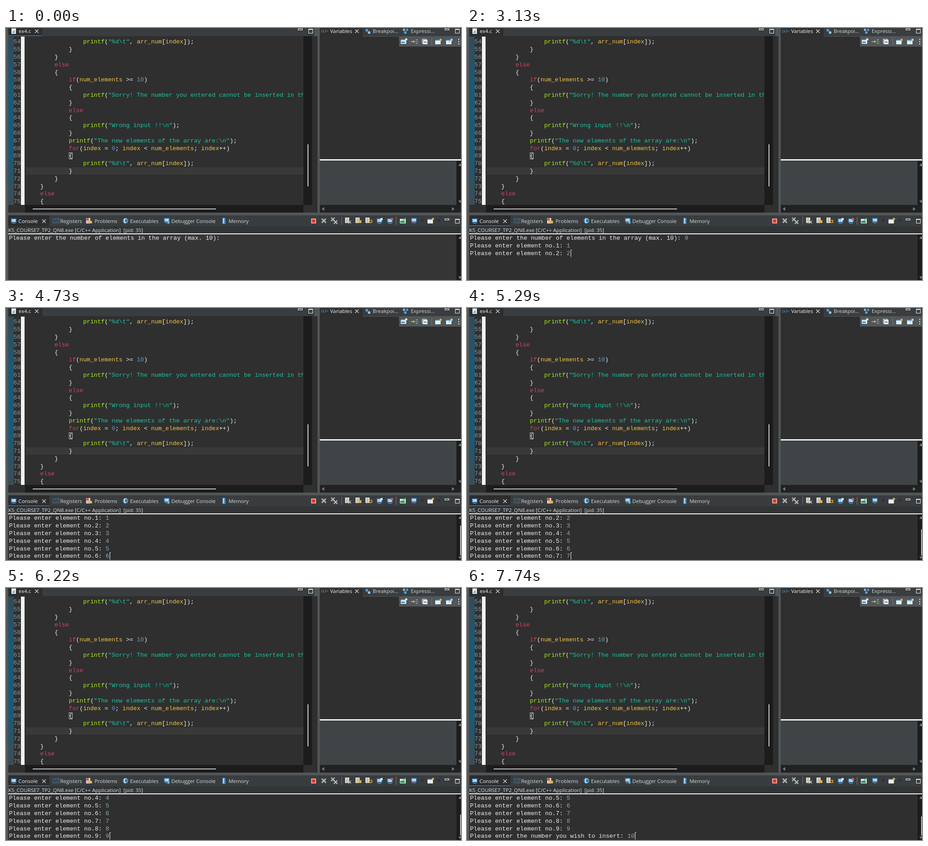
These frames come from a looping animation (1005 px wide and 557 px high, 8 s). An HTML page with a canvas:

```html
<!DOCTYPE html>
<html lang="en">
<head>
<meta charset="utf-8">
<title>Console session</title>
<style>
html, body { margin: 0; width: 100%; height: 100%; overflow: hidden; background: #515658; }
canvas { display: block; }
</style>
</head>
<body>
<canvas id="stage" width="1005" height="557"></canvas>
<script>
const g = document.getElementById('stage').getContext('2d');
const CHAR = 7.9, LINE = 16.8, LOOP = 8000;
const MONO = '13.165px "Liberation Mono", monospace';
const UI = '11.4px "Open Sans", "Noto Sans", sans-serif';
const FRAME = '#515658', BAR = '#393d3f', PANE = '#2f2f2f', TRACK = '#1c1c1c', TAB = '#2b2d2e';
const WHITE = '#f4f4f4', PALE = '#d8dadb', BLUE = '#4f9fd8', GOLD = '#e3b341', RED = '#e0533f';

function box(color, x, y, w, h) {
  g.fillStyle = color;
  g.fillRect(x, y, w, h);
}
function text(str, x, y, color = PALE, font = UI) {
  g.font = font;
  g.fillStyle = color;
  g.fillText(str, x, y);
}
function line(color, width, ...pts) {
  g.strokeStyle = color;
  g.lineWidth = width;
  g.beginPath();
  for (let i = 0; i < pts.length; i += 2) g.lineTo(pts[i], pts[i + 1]);
  g.stroke();
}
function outline(color, x, y, w, h) {
  g.strokeStyle = color;
  g.lineWidth = 1;
  g.strokeRect(x + .5, y + .5, w - 1, h - 1);
}
function dot(color, x, y, r) {
  g.fillStyle = color;
  g.beginPath();
  g.arc(x, y, r, 0, 7);
  g.fill();
}
function cross(x, y, r, color = PALE, width = 1.2) {
  line(color, width, x - r, y - r, x + r, y + r);
  line(color, width, x + r, y - r, x - r, y + r);
}
function arrow(x, y, dx, dy, color = '#77797a', r = 4) {
  g.fillStyle = color;
  g.beginPath();
  g.moveTo(x + dx * r, y + dy * r);
  g.lineTo(x - dx * r / 2 + dy * r, y - dy * r / 2 + dx * r);
  g.lineTo(x - dx * r / 2 - dy * r, y - dy * r / 2 - dx * r);
  g.fill();
}
function paneButtons(x, y) {
  outline(WHITE, x - 5, y - 1, 10, 4);
  outline(WHITE, x + 18, y, 10, 10);
  box(WHITE, x + 18, y, 10, 2);
}

// small toolbar pictures, centred on x, y
function page(x, y, accent) {
  box('#e9e4d2', x - 6, y - 6, 9, 12);
  for (let i = 0; i < 4; i++) box('#7a8b99', x - 4, y - 4 + i * 2.5, 5, 1);
  if (accent) box(accent, x + 1, y, 6, 6);
}
function screen(x, y, accent) {
  box('#3f86c6', x - 6, y - 5, 12, 9);
  box('#e6f0f8', x - 4, y - 3, 8, 5);
  box('#3f86c6', x - 3, y - 1, 5, 1);
  box('#9fb4c4', x - 4, y + 5, 8, 1);
  if (accent) box(accent, x + 2, y - 6, 5, 5);
}
function windowIcon(x, y, accent) {
  box('#e8eef2', x - 7, y - 4, 12, 10);
  box(BLUE, x - 7, y - 4, 12, 2);
  dot(accent, x + 5, y - 4, 2.5);
}

const code = String.raw`4printf("%d\t", arr_num[index]);
3}
2}
2else
2{
3if(num_elements >= 10)
3{
4printf("Sorry! The number you entered cannot be inserted in the
3}
3else
3{
4printf("Wrong input !!\n");
3}
3printf("The new elements of the array are:\n");
3for(index = 0; index < num_elements; index++)
3{
4printf("%d\t", arr_num[index]);
3}
2}
1}
1else
1{`.split('\n');

function tokenColor(tok) {
  if (tok[0] === '"') return '#17c6a3';
  if (tok === 'printf') return '#a7ec21';
  if (/^(if|else|for)$/.test(tok)) return '#d9435f';
  if (/^\d/.test(tok)) return '#6897bb';
  return /^\w/.test(tok) ? '#f2c443' : '#f0f1ec';
}

function drawEditor() {
  box(BAR, 5, 0, 676, 18);
  box(TAB, 5, 0, 75, 18);
  box('#e8eef2', 12, 1, 10, 12);
  text('.c', 13, 11, '#2465a0', 'bold 9px "Open Sans", sans-serif');
  text('ex4.c', 28, 11, WHITE);
  cross(68, 7, 4);
  paneButtons(650, 2);

  box(PANE, 5, 18, 683, 390);
  box(TRACK, 657, 18, 19, 373);
  box(TRACK, 42, 391, 615, 17);
  box('#d0d0d0', 666, 257, 2, 93);
  box('#c4c4c4', 59, 399, 405, 2);

  const strip = g.createLinearGradient(0, 19, 0, 391);
  strip.addColorStop(0, '#36454d');
  strip.addColorStop(.3, '#1b5670');
  strip.addColorStop(.7, '#1b5670');
  strip.addColorStop(1, '#40474b');
  box(strip, 5, 19, 12, 372);
  for (let y = 19; y < 391; y++)
    for (let x = 5 + y % 2; x < 17; x += 2) box('rgba(25,130,175,.2)', x, y, 1, 1);
  box('#f3f3f3', 33, 19, 8, 372);
  box('#393939', 44, 308, 613, 16);

  g.save();
  g.beginPath();
  g.rect(5, 19, 652, 372);
  g.clip();
  code.forEach((row, i) => {
    const y = 34.4 + i * LINE;
    text(String(54 + i), 16.5, y, '#8798a5', MONO);
    let x = 44 + row[0] * 4 * CHAR;
    for (const tok of row.slice(1).match(/"[^"]*"?|\w+|\s+|[^\w\s"]/g)) {
      text(tok, x, y, tokenColor(tok), MONO);
      x += tok.length * CHAR;
    }
  });
  g.restore();
  outline('#c8c8c8', 139, 275, 8, 15);
}

function drawVariables() {
  box(BAR, 693, 0, 312, 18);
  box(PANE, 693, 0, 95, 19);
  text('(x)=', 696, 10, BLUE, '9.5px "Open Sans", sans-serif');
  text('Variables', 716, 11, WHITE);
  cross(775, 7, 4);
  dot(BLUE, 797, 5, 3);
  dot('#8fc3e8', 802, 10, 3);
  text('Breakpoi...', 810, 11);
  dot('#8fc3e8', 879, 4, 2.5);
  dot(BLUE, 886, 4, 2.5);
  dot(BLUE, 882, 10, 3);
  text('Expressi...', 894, 11);
  paneButtons(974, 2);

  box(PANE, 693, 19, 312, 275);
  box(FRAME, 868, 19, 137, 22);
  windowIcon(879, 29, '#d8e6f0');
  box('#4d87b0', 873, 30, 8, 3);
  line(GOLD, 1.5, 894, 30, 902, 30);
  arrow(901, 30, 1, 0, GOLD, 3);
  for (let i = 0; i < 3; i++) box(BLUE, 905, 25 + i * 4, 5, 2);
  outline(WHITE, 919, 24, 10, 10);
  box('#e8eef2', 921, 26, 10, 10);
  box('#4c7fa8', 923, 30, 6, 2);
  box('#75797b', 940, 22, 1, 16);
  windowIcon(955, 30, GOLD);
  windowIcon(979, 30, '#d8dadb');
  line('#8fa3b0', 1.5, 978, 31, 984, 25);
  for (let i = 0; i < 3; i++) dot(WHITE, 1000, 25 + i * 5, 1.2);

  box('#f5f5f5', 693, 290, 312, 3);
  box('#3f4447', 693, 294, 302, 97);
  box(TRACK, 995, 294, 10, 97);
  box('#222', 693, 391, 312, 17);
  arrow(1003, 303, 0, -1);
  arrow(1003, 383, 0, 1);
  arrow(701, 400, -1, 0);
  arrow(987, 400, 1, 0);
}

function drawConsoleBar() {
  box(BAR, 5, 414, 1000, 24);
  box(TAB, 5, 414, 91, 24);
  screen(17, 426);
  text('Console', 27.5, 430.5, WHITE);
  cross(84, 427, 4);
  text('1010', 102, 425, '#4b86ae', '7px "Liberation Mono", monospace');
  text('0101', 102, 432, '#4b86ae', '7px "Liberation Mono", monospace');
  text('Registers', 119.5, 430.5);
  page(183, 426, GOLD);
  dot(RED, 180, 423, 3);
  text('Problems', 195.5, 430.5);
  dot('#5f9ac4', 264, 426, 6);
  box('#dfe9f0', 261, 421, 4, 10);
  arrow(265, 426, 1, 0, '#2c6a9a', 4);
  text('Executables', 274, 430.5);
  screen(355, 425);
  dot('#69c0d8', 359, 430, 2.5);
  text('Debugger Console', 365, 430.5);
  box('#3f86c6', 478, 420, 7, 13);
  box('#a9d3ee', 479, 420, 3, 12);
  text('Memory', 491.5, 430.5);

  box('#f2a08f', 674, 421, 11, 11);
  box('#d93a2f', 676, 423, 7, 7);
  cross(702, 426, 4.5, '#b4b7b8', 3);
  cross(722, 423, 3.8, '#b4b7b8', 2.5);
  cross(728, 429, 3.8, '#b4b7b8', 2.5);
  for (const x of [741, 861]) box('#75797b', x, 417, 1, 18);
  page(755, 425);
  cross(759, 429, 3, '#c5c9cb', 1.5);
  page(778, 425, GOLD);
  page(800, 425);
  line(GOLD, 1.5, 801, 430, 808, 430, 808, 425, 804, 425);
  screen(825, 426, '#d8e6f0');
  screen(848, 426, RED);
  box('#e8eef2', 870, 422, 13, 10);
  box('#3f9b5c', 871, 426, 10, 5);
  line('#4fb56d', 2, 876, 426, 883, 420);
  screen(901, 425);
  arrow(919, 425, 0, 1, '#25282a', 3);
  windowIcon(938, 426, GOLD);
  arrow(956, 425, 0, 1, '#25282a', 3);
  paneButtons(974, 422);

  box('#323435', 5, 438, 1000, 16);
  text('K5_COURSE7_TP2_QN8.exe [C/C++ Application]  [pid: 35]', 5, 450.5, PALE);
}

// [line starts, prompt appears, answer typed]
const session = [
  [0, 0, 1520], [1980, 2110, 2710], [2910, 2910, 3130], [3260, 3260, 3460],
  [3660, 3660, 3880], [4080, 4080, 4350], [4530, 4530, 4730], [4950, 5020, 5290],
  [5420, 5490, 5690], [5890, 5960, 6220], [6420, 6490, 7680]
];
const ROWS = 6, LAST = session.length - 1, SECOND_DIGIT = 7740, FOCUS = 460;

function promptOf(n) {
  if (n === 0) return 'Please enter the number of elements in the array (max. 10): ';
  if (n === LAST) return 'Please enter the number you wish to insert: ';
  return `Please enter element no.${n}: `;
}
function answerOf(n, t) {
  if (t < session[n][2]) return '';
  if (n === LAST) return t < SECOND_DIGIT ? '1' : '10';
  return String(n || 9);
}
function caretShown(t) {
  return t >= FOCUS && !(t >= 990 && t < 1520) && !(t >= 7020 && t < 7540);
}

// the active pane has a blue line under its tab
function drawFocus(inConsole) {
  box(inConsole ? TAB : '#2d6a94', 5, 16, 75, 2);
  box(inConsole ? '#2d6a94' : TAB, 5, 436, 91, 2);
}

function drawConsole(t) {
  box(t < FOCUS ? '#353535' : PANE, 5, 454, 990, 103);
  box(TRACK, 995, 454, 10, 103);
  box('#f5f5f5', 5, 454, 1000, 2);
  arrow(1003, 464, 0, -1);
  arrow(1003, 551, 0, 1);

  const current = session.filter(s => s[0] <= t).length - 1;
  const scroll = Math.max(0, current - ROWS + 1);
  if (scroll) {
    const top = 470 + 77 * scroll / (scroll + ROWS);
    box('#b9b9b9', 1003, top, 2, 547 - top);
  }
  for (let n = scroll; n <= current; n++) {
    const y = 468.4 + (n - scroll) * LINE, prompt = promptOf(n);
    if (t >= session[n][1]) text(prompt, 6.7, y, '#eeeeee', MONO);
    text(answerOf(n, t), 6.7 + prompt.length * CHAR, y, '#8fa8ba', MONO);
  }
  if (caretShown(t)) {
    const typed = answerOf(current, t);
    const col = typed || !current ? promptOf(current).length + typed.length : 0;
    const x = Math.round(7.3 + col * CHAR), y = Math.round(456 + (current - scroll) * LINE);
    box(WHITE, x, y, 1, 16);
    box(WHITE, x + 1, y, 1.5, 1);
  }
}

drawEditor();
drawVariables();
drawConsoleBar();
const start = performance.now();
function tick() {
  const t = (performance.now() - start) % LOOP;
  drawFocus(t >= FOCUS);
  drawConsole(t);
  requestAnimationFrame(tick);
}
tick();
</script>
</body>
</html>
```
